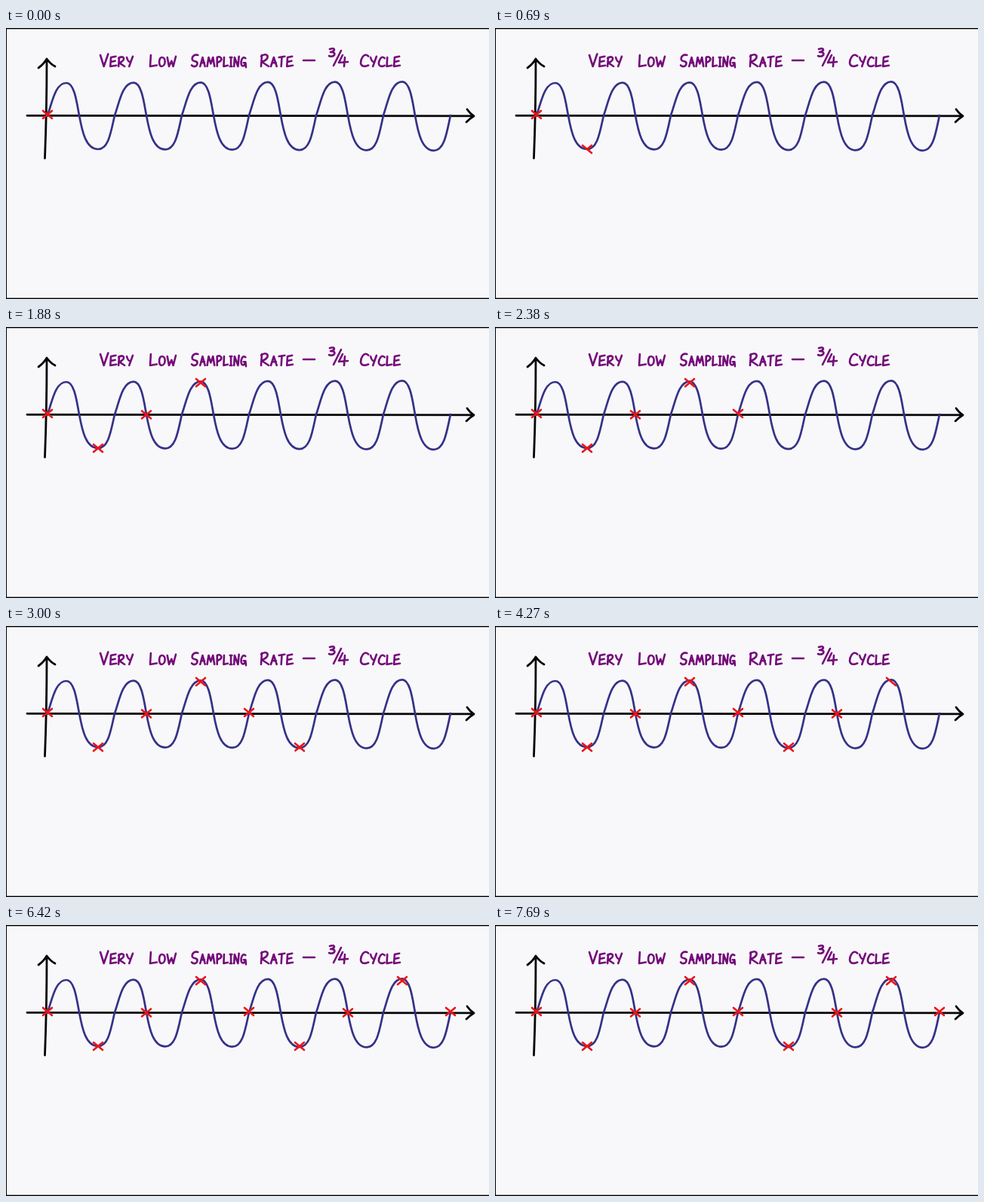
An HTML page with a canvas for the animation above (8 s loop, 640 px wide and 360 px high).

```html
<!DOCTYPE html>
<html lang="en">
<head>
<meta charset="utf-8">
<title>Very low sampling rate</title>
<style>
html, body { margin: 0; width: 100%; height: 100%; overflow: hidden; background: #f8f8fa; }
canvas { display: block; }
</style>
</head>
<body>
<canvas width="640" height="360" role="img" aria-label="Very low sampling rate – 3/4 cycle"></canvas>
<script>
const ctx = document.querySelector('canvas').getContext('2d');
const LOOP = 8000, PERIOD = 89, ORIGIN = { x: 55, y: 116 };

// Handwritten capitals, each in a 10 x 10 box
const glyphs = {
  V: 'M0 0L4.5 10L10 -1',
  E: 'M1 0L0 10L10 9M1 0L9 -1M1 5L8 4',
  R: 'M1 0L0 10M0 1C6 -2 10 0 8 3Q6 5 1 6L10 10',
  Y: 'M0 0Q2 5 5 5M10 -1L4 10',
  L: 'M1 0L0 10L10 9',
  O: 'M5 0C-1 0 -1 10 4 10C11 10 12 0 5 0',
  W: 'M0 0L2 10L5 4L7 10L10 -1',
  S: 'M10 0C5 -1 0 1 1 4C2 6 9 5 9 7C9 10 4 11 0 9',
  A: 'M0 10L5 0L10 10M2 6L9 6',
  M: 'M0 10L2 0L5 7L8 0L10 10',
  P: 'M1 10L1 0C8 -2 12 2 8 4Q6 5 1 6',
  I: 'M5 0L5 10M0 0L10 0M0 10L10 10',
  N: 'M0 10L1 0L8 10L10 -1',
  G: 'M9 1C3 -2 -1 4 0 7C1 11 8 10 9 6L5 6M9 6L10 11',
  T: 'M0 0L10 -1M5 0L4 10',
  C: 'M10 1C4 -3 0 4 0 7C1 11 7 10 10 9'
};
const widths = { W: 1.4, M: 1.5, L: 0.85, I: 0.4 };
const GAP = 2.9, BASELINE = 51;

// The dash and the fraction; words are added to them
const title = new Path2D('M394 43L409 43M429 28Q435 26 435 29Q434 32 430 32Q437 32 435 36Q432 39 428 37M444 30L434 50M446 36L441 46L453 45M449 39L448 51');

// Fits a word between two edges, with a larger initial
function addWord(word, left, right) {
  const sizes = [...word].map((c, i) => (widths[c] || 1) * (i ? 1 : 1.3));
  const total = sizes.reduce((a, b) => a + b);
  const unit = (right - left - GAP * (word.length - 1)) / total;
  let x = left;
  sizes.forEach((size, i) => {
    const top = i ? 39 : 36, width = size * unit;
    title.addPath(new Path2D(glyphs[word[i]]),
      new DOMMatrix([width / 10, 0, 0, (BASELINE - top) / 10, x, top]));
    x += width + GAP;
  });
}
addWord('VERY', 125, 168);
addWord('LOW', 191, 225);
addWord('SAMPLING', 246, 318);
addWord('RATE', 338, 380);
addWord('CYCLE', 470, 522);

const axes = new Path2D('M54 42Q54 110 51.5 173M43 53Q50 48 54 41Q59 48 65 51M28 116.3Q320 117.5 619 116.8M611 108Q615 114 620 117Q615 120 610 125');

// One hand-drawn cycle, repeated along the axis
const cycle = new Path2D('M0 0C6 -16 10 -43 25 -43C36 -43 39 -15 42 0C46 22 51 45 67 45C81 45 84 22 89 0');
const wave = new Path2D();
for (let k = 0; k < 6; k++) {
  wave.addPath(cycle, new DOMMatrix([1, 0, 0, 1 + k * 0.008, ORIGIN.x + k * PERIOD, ORIGIN.y]));
}

// Sampling every 3/4 cycle meets start, trough, falling crossing and peak in turn
const phases = [[0, -1], [67, 45], [42, 0.5], [25, -42]];
const starts = [-LOOP, 540, 1040, 1650, 2240, 2805, 3550, 4180, 4930];
const crosses = starts.map((start, k) => {
  const [dx, dy] = phases[k % 4];
  return { start, x: ORIGIN.x + Math.floor(k * 0.75) * PERIOD + dx, y: ORIGIN.y + dy };
});

const clamp = v => Math.max(0, Math.min(1, v));

function stroke(path, color, width) {
  ctx.strokeStyle = color;
  ctx.lineWidth = width;
  ctx.stroke(path);
}

// Two strokes, one after the other, within 200 ms
function addCross(path, { x, y, start }, t) {
  const p = (t - start) / 200;
  [1, -1].forEach((side, i) => {
    const q = clamp((p - 0.55 * i) / 0.45);
    if (!q) return;
    path.moveTo(x - 6 * side, y - 5);
    path.lineTo(x + (12 * q - 6) * side, y - 5 + 10 * q);
  });
}

function draw(t) {
  ctx.fillStyle = '#f8f8fa';
  ctx.fillRect(0, 0, 640, 360);
  ctx.fillStyle = '#000';
  ctx.fillRect(0, 0, 640, 1.4);
  ctx.fillRect(0, 358.6, 640, 1.4);
  ctx.fillRect(0, 0, 1, 360);
  ctx.lineCap = ctx.lineJoin = 'round';

  stroke(axes, '#050505', 2.8);
  stroke(wave, '#343287', 2.7);
  stroke(title, '#740b7a', 2.6);

  const marks = new Path2D();
  crosses.forEach(cross => addCross(marks, cross, t));
  stroke(marks, '#ee1418', 2.6);
}

const begin = performance.now();
function frame() {
  draw((performance.now() - begin) % LOOP);
  requestAnimationFrame(frame);
}
frame();
</script>
</body>
</html>
```
